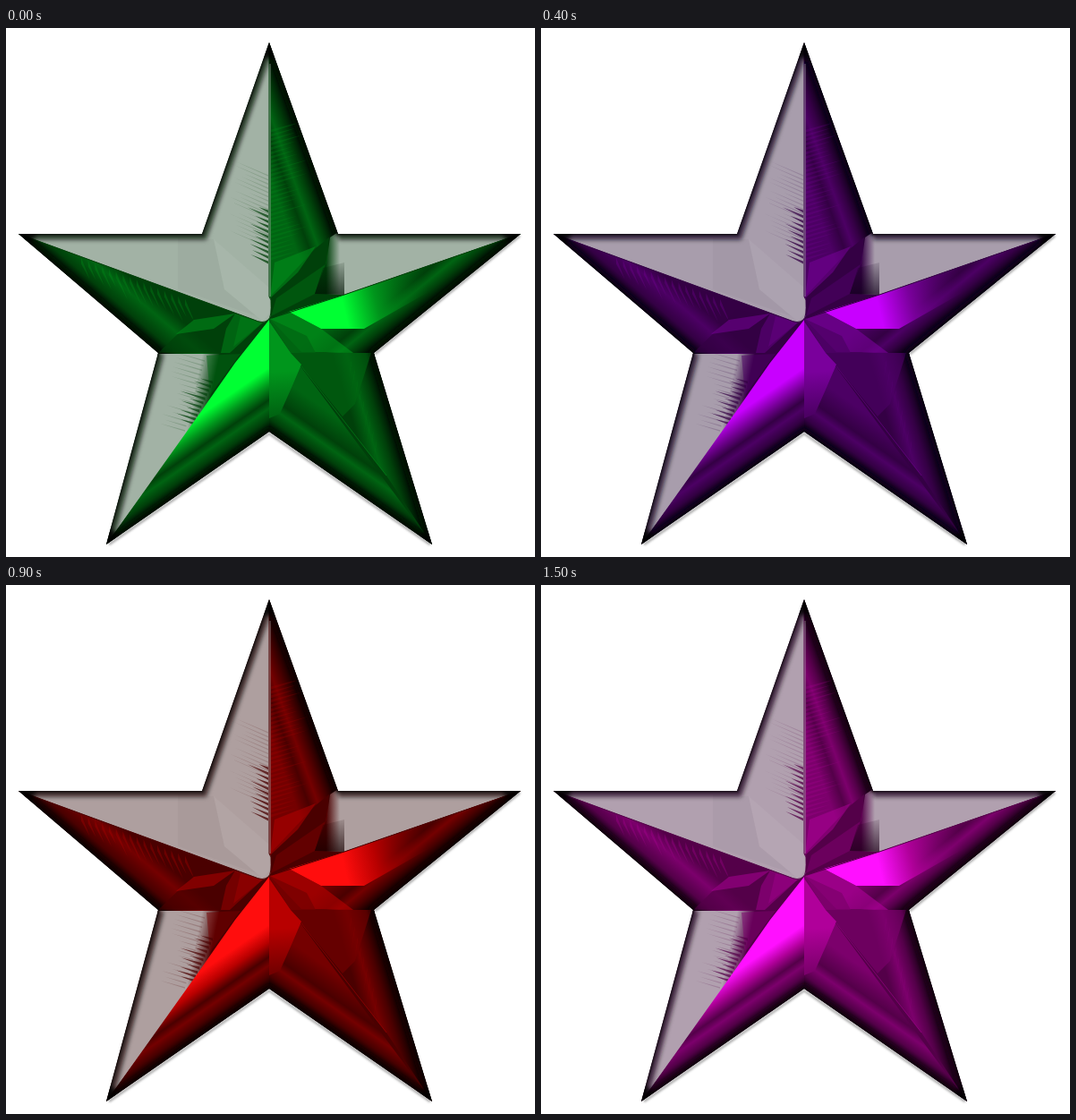
Recreate the animation shown at these times as an HTML page. Size 591 px wide and 591 px high, loop 1700 ms.

```html
<!DOCTYPE html>
<html lang="en">
<head>
<meta charset="utf-8">
<title>Colour-changing star</title>
<style>
html, body { margin: 0; width: 100%; height: 100%; overflow: hidden; background: #fff; }
svg { display: block; width: 100%; height: 100%; animation: hue 1700ms step-end infinite; }

/* b bright, m middle, h half dark, d dark, k rim, g glass */
@keyframes hue {
  0%       { --b: #00ff33; --m: #00961c; --h: #006412; --d: #00400a; --k: #001203; --g: #a2b2a5; }
  11.7647% { --b: #ffff00; --m: #e6b800; --h: #b08800; --d: #846400; --k: #3a2b00; --g: #bdb6a1; }
  23.5294% { --b: #c800ff; --m: #7a009c; --h: #4c0064; --d: #340044; --k: #10001a; --g: #a89dac; }
  41.1764% { --b: #ffd000; --m: #d86a00; --h: #a04a00; --d: #703400; --k: #2a1200; --g: #b3a59c; }
  52.9411% { --b: #ff0d0d; --m: #b80000; --h: #740000; --d: #4a0000; --k: #160000; --g: #ae9f9f; }
  76.4705% { --b: #2038ff; --m: #0d1fcc; --h: #070f94; --d: #050a68; --k: #020324; --g: #a2a2b8; }
  88.2352%, 100% { --b: #ff10ff; --m: #b0009a; --h: #7c006c; --d: #540049; --k: #1c0018; --g: #b1a0af; }
}
.b { stop-color: var(--b); }
.m { stop-color: var(--m); }
.h { stop-color: var(--h); }
.d { stop-color: var(--d); }
.k { stop-color: var(--k); }
.g { stop-color: var(--g); }
.o { stop-opacity: 0; }
.fm { fill: var(--m); }
.fh { fill: var(--h); }
.fd { fill: var(--d); }
.fk { fill: var(--k); }
.fg { fill: var(--g); }
</style>
</head>
<body>
<svg viewBox="0 0 591 591" xmlns="http://www.w3.org/2000/svg">
  <defs>
    <path id="star" d="M294 16 371 230 575 230 411 363 476 577 294 451 112 577 170 363 14 230 219 230Z"/>
    <clipPath id="cut"><use href="#star"/></clipPath>
    <filter id="soft" filterUnits="userSpaceOnUse" x="0" y="0" width="591" height="591"><feGaussianBlur stdDeviation="1.2"/></filter>
    <filter id="haze" filterUnits="userSpaceOnUse" x="0" y="0" width="591" height="591"><feGaussianBlur stdDeviation="2.6"/></filter>

    <linearGradient id="top" gradientUnits="userSpaceOnUse" x1="332" y1="122" x2="285" y2="139">
      <stop class="k"/><stop offset=".1" class="k"/><stop offset=".32" class="d"/><stop offset=".52" class="h"/><stop offset=".72" class="d"/><stop offset="1" class="h"/>
    </linearGradient>
    <linearGradient id="left" gradientUnits="userSpaceOnUse" x1="92" y1="296" x2="144" y2="235">
      <stop class="k"/><stop offset=".05" class="k"/><stop offset=".16" class="d"/><stop offset=".38" class="h"/><stop offset=".55" class="d"/><stop offset="1" class="d"/>
    </linearGradient>
    <linearGradient id="right" gradientUnits="userSpaceOnUse" x1="493" y1="296" x2="443" y2="234">
      <stop class="k"/><stop offset=".06" class="k"/><stop offset=".18" class="d"/><stop offset=".3" class="h"/><stop offset=".42" class="d"/><stop offset=".7" class="h"/><stop offset="1" class="h"/>
    </linearGradient>
    <linearGradient id="shine" gradientUnits="userSpaceOnUse" x1="340" y1="316" x2="470" y2="286">
      <stop class="b"/><stop offset=".28" class="b"/><stop offset=".55" class="m"/><stop offset="1" class="h o"/>
    </linearGradient>
    <linearGradient id="lowL" gradientUnits="userSpaceOnUse" x1="203" y1="514" x2="163" y2="456">
      <stop class="k"/><stop offset=".05" class="k"/><stop offset=".17" class="d"/><stop offset=".31" class="h"/><stop offset=".42" class="d"/><stop offset=".62" class="m"/><stop offset=".84" class="b"/>
    </linearGradient>
    <linearGradient id="lowR" gradientUnits="userSpaceOnUse" x1="385" y1="514" x2="431" y2="448">
      <stop class="k"/><stop offset=".05" class="k"/><stop offset=".15" class="d"/><stop offset=".29" class="h"/><stop offset=".4" class="d"/><stop offset=".7" class="h"/>
    </linearGradient>
    <linearGradient id="side" gradientUnits="userSpaceOnUse" x1="443" y1="470" x2="386" y2="487">
      <stop class="k"/><stop offset=".08" class="k"/><stop offset=".28" class="d"/><stop offset=".5" class="h"/><stop offset=".75" class="d"/><stop offset="1" class="d"/>
    </linearGradient>
    <linearGradient id="facet" gradientUnits="userSpaceOnUse" x1="300" y1="345" x2="306" y2="432">
      <stop class="m"/><stop offset=".45" class="m"/><stop offset="1" class="h"/>
    </linearGradient>
    <linearGradient id="pane" gradientUnits="userSpaceOnUse" x1="352" y1="0" x2="380" y2="0">
      <stop class="d"/><stop offset=".2" class="d"/><stop offset=".75" class="g"/>
    </linearGradient>
    <linearGradient id="foot" gradientUnits="userSpaceOnUse" x1="203" y1="392" x2="232" y2="398">
      <stop class="g"/><stop offset=".35" class="g"/><stop offset="1" class="d"/>
    </linearGradient>
    <linearGradient id="shade" gradientUnits="userSpaceOnUse" x1="0" y1="255" x2="0" y2="298">
      <stop class="k o"/><stop offset="1" class="k" stop-opacity=".7"/>
    </linearGradient>
  </defs>

  <path fill="none" stroke="#666" stroke-opacity=".5" stroke-width="3" filter="url(#soft)" d="M574 232 412 364M115 577 294 453 474 577"/>

  <g clip-path="url(#cut)">
    <use href="#star" class="fd"/>

    <!-- upper right half of the top point -->
    <path fill="url(#top)" d="M294 16 371 230 372 262 294 326Z"/>
    <g id="ribsTop"></g>
    <path class="fd" d="M295 326V300L346 246 361 234 357 266 345 297Z"/>
    <path class="fm" d="M295 302 300 262 346 244 326 273Z" opacity=".5"/>
    <path class="fh" d="M296 322 302 302 357 264 345 297Z" opacity=".6"/>

    <!-- right point -->
    <path fill="url(#pane)" d="M371 228 580 228 378 298 345 297 358 262 362 234Z"/>
    <path fill="url(#shade)" d="M354 268 378 262V298L345 297Z"/>
    <path fill="url(#right)" d="M294 326 378 298 577 229 411 366 318 363Z"/>
    <path fill="url(#shine)" d="M316 317 378 298 560 235 470 296 400 336 352 336Z"/>
    <path class="fm" d="M295 325 316 317 352 336 388 363 330 362Z" opacity=".6"/>
    <path class="fh" d="M295 325 336 344 346 363 318 363Z" opacity=".7"/>

    <!-- left point -->
    <path fill="url(#left)" d="M12 229 287 329 294 330 260 366 170 366Z"/>
    <g id="ribsLeft"></g>
    <path class="fd" d="M170 363 200 334 218 314 287 329 250 363Z" opacity=".7"/>
    <path class="fm" d="M190 342 210 326 256 319 232 336Z" opacity=".5"/>
    <path class="fh" d="M256 319 287 329 250 363 240 363 246 336Z"/>
    <path class="fm" d="M262 322 287 329 254 356Z" opacity=".3"/>

    <!-- lower right point -->
    <path fill="url(#lowR)" d="M294 326 318 363 476 577 294 451Z"/>
    <path fill="url(#side)" d="M318 363 411 363 476 577 425 500Z"/>
    <path class="fh" d="M318 363 408 363 390 420 376 434Z" opacity=".65"/>
    <g id="ribsSide"></g>
    <path fill="none" stroke="var(--m)" d="M330 378 425 500" opacity=".5"/>
    <path fill="url(#facet)" d="M294 328 318 363 330 376 318 404 306 431 294 436Z"/>

    <!-- lower left point -->
    <path fill="url(#foot)" d="M170 364 262 364 216 434 112 577Z"/>
    <path class="fh" d="M224 366 262 364 228 410Z" opacity=".5"/>
    <g id="ribsFoot"></g>
    <path fill="url(#lowL)" d="M294 326 294 451 112 577 214 434 256 374Z"/>

    <!-- glass across the upper left -->
    <path class="fg" d="M294 16 294 300 296 303 296 320Q295 327 287 329L277 326 12 229 219 229Z"/>
    <path fill="#fff" opacity=".05" d="M232 236 294 290 295 318 287 328 244 292Z"/>
    <path fill="#000" opacity=".03" d="M192 234 232 236 244 292 280 322 192 292Z"/>
    <g id="ribsGlass"></g>

    <!-- ridges -->
    <path fill="none" stroke="var(--d)" d="M14 230 277 326Q287 331 293 326 297 323 296 304L294 300V20M297 324 378 298 575 230"/>
    <path fill="none" stroke="var(--g)" stroke-width=".8" d="M295 40V300"/>

    <!-- dark rim -->
    <g fill="none" stroke="var(--k)" filter="url(#haze)">
      <path stroke-width="13" opacity=".75" d="M294 16 219 230H14M371 230H575M170 363 112 577"/>
      <path stroke-width="8" d="M575 230 411 363 476 577 294 451 112 577M14 230 170 363M294 16 371 230"/>
    </g>
    <use href="#star" fill="none" stroke="#000" stroke-width="2.5" opacity=".75" filter="url(#soft)"/>
    <path fill="none" stroke="#000" stroke-width="9" opacity=".8" filter="url(#haze)" d="M288 33 294 16 300 33M33 230H14L28 242M556 230H575L561 242M116 560 112 577 126 567M472 560 476 577 462 567"/>
  </g>
</svg>
<script>
let seed = 7;
const rand = () => (seed = seed * 16807 % 2147483647) / 2147483647;

// A row of tapering slivers from (x0,y0) to (x1,y1), each pointing along (dx,dy).
function ribs(id, x0, y0, x1, y1, dx, dy, count, thick, cls, opacity) {
  let d = '';
  for (let i = 0; i < count; i++) {
    const t = i / (count - 1), len = 0.45 + 0.55 * rand();
    const x = x0 + (x1 - x0) * t, y = y0 + (y1 - y0) * t;
    d += `M${x} ${y - thick / 2}L${x + dx * len} ${y + dy * len}L${x} ${y + thick / 2}Z`;
  }
  document.getElementById(id).innerHTML += `<path class="${cls}" opacity="${opacity}" d="${d}"/>`;
}

ribs('ribsGlass', 293, 205, 293, 262, -24, -11, 11, 3, 'fd', 0.75);
ribs('ribsGlass', 293, 165, 293, 245, -46, -20, 18, 1.6, 'fd', 0.16);
ribs('ribsTop', 296, 115, 296, 258, 44, -13, 30, 3, 'fm', 0.22);
ribs('ribsLeft', 84, 260, 200, 306, 14, 30, 16, 7, 'fm', 0.3);
ribs('ribsSide', 386, 372, 414, 462, -5, 34, 9, 4, 'fm', 0.2);
ribs('ribsFoot', 231, 396, 210, 442, -28, -9, 11, 3.2, 'fd', 0.7);
ribs('ribsFoot', 222, 372, 200, 450, -34, -10, 16, 1.6, 'fd', 0.2);
</script>
</body>
</html>
```
